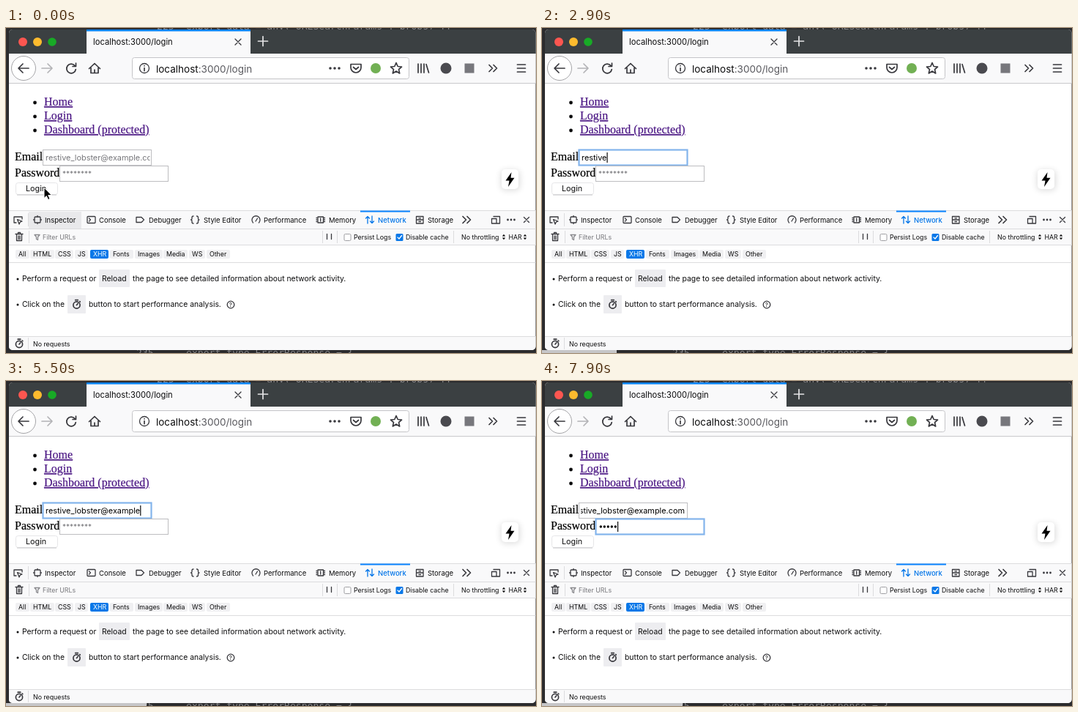
Write an HTML page that moves like this. It is 724x444 px and loops after 8000 ms.

```html
<!DOCTYPE html>
<html lang="en">
<head>
<meta charset="utf-8">
<title>Login demo</title>
<style>
html, body { margin: 0; width: 100%; height: 100%; overflow: hidden; background: #2b2b2d; }
svg { display: block; width: 724px; height: 444px; font-family: Inter, sans-serif; fill: #0c0c0d; }
text { white-space: pre; }
.serif { font: 16px "Liberation Serif", serif; fill: #000; stroke: #000; stroke-width: .2; }
.link { fill: #4b1784; stroke: #4b1784; text-decoration: underline; }
.mono { font: 13.1px "DejaVu Sans Mono", monospace; fill: #858588; }
.field { font-size: 10.9px; fill: #000; }
.tool { font-size: 9.5px; }
.small { font-size: 8.8px; }
.body { font-size: 10.38px; }
.ico { fill: none; stroke: #38383d; stroke-width: 1.3; stroke-linecap: round; stroke-linejoin: round; }
.big { stroke-width: 1.7; }
.sep { fill: none; stroke: #dcdcde; }
.chip { fill: #ededf0; }
.hint { fill: #77777b; }
</style>
</head>
<body>
<svg viewBox="0 0 724 444">
  <defs>
    <clipPath id="inEmail"><rect x="53" y="167" width="143.5" height="20"/></clipPath>
    <clipPath id="topStrip"><rect width="724" height="2"/></clipPath>
    <clipPath id="frame"><rect x="4" y="2" width="719.500" height="438" rx="5"/></clipPath>
    <filter id="soft" x="-60%" y="-60%" width="220%" height="220%"><feGaussianBlur stdDeviation="4"/></filter>
    <g id="watch" class="ico big"><circle cy="1" r="4.600"/><path d="M-1.800-5.800H1.800M0 1L1.800-1.200M4.200-4l.6.6"/></g>
    <path id="more" class="ico big" d="M-5-4.500L-.5 0L-5 4.500M1-4.500L5.500 0L1 4.500"/>
    <path id="updown" d="M-2.200-1L0-3.800L2.200-1ZM-2.200 1L0 3.800L2.200 1Z"/>
  </defs>

  <!-- desktop behind the window -->
  <rect width="724" height="444" fill="#2b2b2d"/>
  <g clip-path="url(#topStrip)" class="mono">
    <text x="206" y="2">225</text>
    <text x="246" y="2">export data = any('URLSearchParams', props) {}</text>
  </g>
  <g class="mono">
    <text x="178" y="448">235</text>
    <text x="246" y="448">export type ErrorResponse = {</text>
  </g>

  <g clip-path="url(#frame)">
  <!-- title bar -->
  <rect x="4" y="2" width="720" height="438" fill="#fff"/>
  <rect x="4" y="2" width="720" height="33" fill="#3b4042"/>
  <circle cx="23" cy="19" r="6" fill="#fc5650"/>
  <circle cx="43" cy="19" r="6" fill="#fdbb2e"/>
  <circle cx="63" cy="19" r="5.800" fill="#18aa26"/>
  <rect x="110" y="2" width="224" height="34" fill="#f9f9fa"/>
  <rect x="110" y="2" width="224" height="2.500" fill="#0a84ff"/>
  <text x="119" y="23" font-size="11.2">localhost:3000/login</text>
  <path class="ico" d="M313 15l8 8M321 15l-8 8"/>
  <path class="ico big" style="stroke:#e4e4e6" d="M344.500 18h13M351 11.500v13"/>

  <!-- navigation bar -->
  <rect x="4" y="35" width="720" height="40.500" fill="#f9f9fa"/>
  <path class="sep" style="stroke:#c9c9cc" d="M4 75.500H724"/>
  <circle cx="24" cy="55" r="16.500" fill="#fff" stroke="#a5a5a8"/>
  <path class="ico big" d="M31 55H17.500M23 49l-6 6l6 6"/>
  <path class="ico big" style="stroke:#b4b4b7" d="M49 55H62.500M57 49l6 6l-6 6"/>
  <path class="ico big" d="M94 51.500A6.300 6.300 0 1 0 95.300 56.500M95.500 48v4.500H91"/>
  <path class="ico big" d="M113.500 55.500L121 48.500L128.500 55.500M116 54v7.500h10V54M121 61v-4"/>
  <rect x="172.500" y="40.500" width="378" height="29" rx="3" fill="#fff" stroke="#c5c5c8"/>
  <circle class="ico" cx="189" cy="55" r="6.500"/>
  <path class="ico big" d="M189 54.500v4M189 51.600v.1"/>
  <text x="205" y="60.500" font-size="13.5">localhost<tspan fill="#59595e">:3000/login</tspan></text>
  <g fill="#38383d"><circle cx="443" cy="55" r="1.800"/><circle cx="449" cy="55" r="1.800"/><circle cx="455" cy="55" r="1.800"/></g>
  <path class="ico big" d="M471 49.500h14v4.500a7 7 0 0 1-14 0ZM474.500 53.500l3.500 3l3.500-3"/>
  <circle cx="505" cy="55" r="7" fill="#72b054"/>
  <path class="ico big" d="M533 47.500l2.200 5l5.300.5l-4 3.600l1.200 5.300l-4.700-2.800l-4.700 2.800l1.200-5.300l-4-3.600l5.300-.5Z"/>
  <path class="ico big" d="M563 49v12M567 49v12M571 49v12M574 49.500l3.500 11.500"/>
  <circle cx="601" cy="55" r="7.500" fill="#4a4a4f"/>
  <rect x="626.500" y="48.500" width="13" height="13" fill="#77777c"/>
  <use href="#more" x="665" y="55"/>
  <path class="ico big" d="M698.500 50h11M698.500 55h11M698.500 60h11"/>

  <!-- page -->
  <circle cx="39.500" cy="102" r="2.400"/><circle cx="39.500" cy="121" r="2.400"/><circle cx="39.500" cy="140" r="2.400"/>
  <text class="serif link" x="52" y="106">Home</text>
  <text class="serif link" x="52" y="125">Login</text>
  <text class="serif link" x="52" y="144">Dashboard (protected)</text>
  <text class="serif" x="12" y="181">Email</text>
  <text class="serif" x="12" y="203">Password</text>
  <rect id="emailBox" x="50.500" y="166.500" width="148" height="21"/>
  <rect id="passBox" x="73.500" y="188.500" width="148" height="21"/>
  <g clip-path="url(#inEmail)"><text id="email" class="field" x="54" y="181"></text></g>
  <text id="passHint" class="hint" x="77" y="203" font-size="10">********</text>
  <g id="dots"></g>
  <rect id="caret" width="1.200" height="14"/>
  <rect x="13.500" y="211.500" width="57" height="16" rx="3" fill="#fff" stroke="#e6e6e8"/>
  <path d="M15 228H69" stroke="#c4c4c7"/>
  <text x="27" y="223" font-size="10.8">Login</text>
  <rect x="676" y="194" width="26" height="28" rx="6" fill="#000" opacity=".13" filter="url(#soft)"/>
  <rect x="677" y="193" width="23" height="27" rx="5" fill="#fff"/>
  <path d="M690.500 197L682.500 208.500H687.500L686 217L694.500 204.800H689.500Z" fill="#000"/>

  <!-- developer tools: tabs -->
  <rect x="4" y="249" width="720" height="48" fill="#f9f9fa"/>
  <rect id="hover" x="31" y="251" width="72" height="23" fill="#e9e9eb"/>
  <path class="sep" d="M4 249.500H724M4 274.500H724M4 296.500H724M4 320.500H724M30.500 253v18"/>
  <path class="ico" d="M14 266h-3v-8h11v3M15.500 261.500l6.500 2.500l-2.800 1.200l-1.200 2.800Z"/>
  <rect class="ico" x="39" y="258" width="8" height="8" rx="1"/>
  <path class="ico" d="M43 256.500v1M43 266.500v1M37.500 262h1M47.500 262h1"/>
  <rect class="ico" x="111" y="257.500" width="11" height="9" rx="1"/>
  <path class="ico" d="M113.500 260l2 2l-2 2"/>
  <path class="ico" d="M178 258.500h7l3.500 3.500l-3.500 3.500h-7Z"/>
  <path class="ico" d="M256 257q-2 0-2 2v1.500q0 1.500-1.500 1.500q1.500 0 1.500 1.500V265q0 2 2 2M260.500 257q2 0 2 2v1.500q0 1.500 1.500 1.500q-1.500 0-1.500 1.500V265q0 2-2 2"/>
  <path class="ico" d="M337.500 266a5.500 5.500 0 1 1 8 0M341 264l2.500-4"/>
  <rect class="ico" x="426" y="258" width="7.500" height="8"/>
  <path class="ico" d="M424 259.500h1M424 262h1M424 264.500h1M434.500 259.500h1M434.500 262h1M434.500 264.500h1M429.700 260v4"/>
  <path class="ico" style="stroke:#0074e8" d="M494 267v-9.500M491.500 260l2.500-2.500l2.500 2.500M500 257v9.500M497.500 264l2.500 2.500l2.500-2.500"/>
  <rect x="484" y="249.500" width="68" height="2" fill="#0a84ff"/>
  <path class="ico" d="M560.500 257.500h9.500v9.500h-9.500ZM560.500 262h9.500M564 259.800h2.500M564 264.500h2.500"/>
  <g class="tool" id="tabs"></g>
  <use href="#more" x="629" y="262"/>
  <path class="ico" d="M666 257.500h8.500v9.500h-4M663.500 260.500h6.500v6.500h-6.500Z"/>
  <g fill="#38383d"><circle cx="685.500" cy="262" r="1.400"/><circle cx="690" cy="262" r="1.400"/><circle cx="694.500" cy="262" r="1.400"/></g>
  <path class="ico" d="M707.500 258.500l7 7M714.500 258.500l-7 7"/>

  <!-- developer tools: filters -->
  <path class="ico" d="M13 281.500h10M16.500 281v-1.500h3V281M14.500 282v8.500h7V282M17 284v4.500M19 284v4.500"/>
  <path class="sep" d="M31.500 277v17M432.500 277v17M452.500 277v17M611.500 277v17"/>
  <path class="ico" style="stroke:#8a8a8e" d="M39 282.500h7l-2.500 3v4l-2-1v-3Z"/>
  <path class="ico" d="M438.500 281.500v7M444.500 281.500v7"/>
  <rect x="462" y="281.500" width="9" height="9" rx="1.500" fill="#fff" stroke="#a0a0a4"/>
  <rect x="532.500" y="281" width="10" height="10" rx="1.500" fill="#0a78e8"/>
  <path class="ico" style="stroke:#fff" d="M535 286l2 2l3.500-4.500"/>
  <g class="small">
    <text class="hint" x="50" y="289">Filter URLs</text>
    <text x="475" y="289">Persist Logs</text>
    <text x="546" y="289">Disable cache</text>
    <text x="622" y="288.500">No throttling</text>
    <text x="686.500" y="288.500">HAR</text>
  </g>
  <use href="#updown" x="680" y="285.500"/><use href="#updown" x="709" y="285.500"/>
  <g class="small" id="kinds"></g>

  <!-- developer tools: message -->
  <circle cx="16" cy="343" r="1.500"/><circle cx="16" cy="378" r="1.500"/>
  <rect class="chip" x="127" y="330" width="42" height="24" rx="1"/>
  <rect class="chip" x="84" y="365" width="25" height="25" rx="1"/>
  <g class="body">
    <text x="22" y="346">Perform a request or</text>
    <text x="131" y="346">Reload</text>
    <text x="173" y="346">the page to see detailed information about network activity.</text>
    <text x="22" y="381">Click on the</text>
    <text x="113" y="381">button to start performance analysis.</text>
  </g>
  <use href="#watch" x="96.500" y="377.500"/>
  <circle class="ico" cx="307" cy="378" r="4.800"/>
  <text x="304.800" y="381" font-size="8">?</text>
  <rect x="4" y="421" width="720" height="19" fill="#f9f9fa"/>
  <path class="sep" d="M4 421.500H724M30.500 423v16"/>
  <use href="#watch" x="18" y="431"/>
  <text class="small" x="37" y="435">No requests</text>
  </g>

  <rect id="progress" y="440" height="4" fill="#c6c6c8"/>
  <path id="arrow" d="M0 0V14.500L3.300 11.500L5.600 16.500L8 15.400L5.700 10.500H10.300Z" fill="#000" stroke="#fff"/>
  <path id="beam" d="M-2.500-7Q0-7 0-5Q0-7 2.500-7M0-5V5M-2.500 7Q0 7 0 5Q0 7 2.500 7" fill="none" stroke="#222"/>
</svg>
<script>
const LOOP = 8000, FOCUS = 1000, TAB = 6000;
const address = "restive_lobster@example.com";
const emailKeys = [
  1500, 1900, 2000, 2200, 2300, 2500, 2700,
  3000, 3200, 3300, 3400, 3600, 3700, 3900, 4100, 4300,
  4700, 4800, 4900, 5000, 5200, 5300, 5500, 5600, 5700, 5800, 5900
];
const passKeys = [6700, 7000, 7200, 7500, 7800];
const $ = id => document.getElementById(id);
const show = (id, on) => $(id).setAttribute("visibility", on ? "visible" : "hidden");
const label = (x, y, s, fill) => `<text x="${x}" y="${y}"${fill ? ` fill="${fill}"` : ""}>${s}</text>`;

$("tabs").innerHTML = [
  [53, "Inspector"], [127, "Console"], [195, "Debugger"], [270, "Style Editor"],
  [352, "Performance"], [441, "Memory"], [508, "Network", "#0074e8\" font-weight=\"500"], [576, "Storage"]
].map(([x, s, c]) => label(x, 265.5, s, c)).join("");

$("kinds").innerHTML = [
  [17, 11, "All"], [37, 25, "HTML"], [71, 17, "CSS"], [98, 10, "JS"], [119, 17, "XHR"],
  [146, 24, "Fonts"], [180, 30, "Images"], [219, 25, "Media"], [254, 14, "WS"], [278, 24, "Other"]
].map(([x, w, s]) => {
  const on = s === "XHR";
  return `<rect x="${x - 4}" y="303" width="${w + 8}" height="12" rx="2" fill="${on ? "#0a78e8" : "#f0f0f2"}"/>`
    + label(x, 312, s, on && "#fff");
}).join("");

$("dots").innerHTML = passKeys.map((k, i) =>
  `<circle cx="${80.3 + i * 5}" cy="199" r="1.7" fill="#000"/>`).join("");

function setBox(id, focused) {
  const box = $(id);
  box.setAttribute("fill", "#fff");
  box.setAttribute("stroke", focused ? "#83b4ec" : "#bdbdc0");
  box.setAttribute("stroke-width", focused ? 2.2 : 1);
}

function draw(t) {
  const typed = emailKeys.filter(k => k <= t).length;
  const hidden = passKeys.filter(k => k <= t).length;
  const inEmail = t >= FOCUS && t < TAB, inPass = t >= TAB;
  setBox("emailBox", inEmail);
  setBox("passBox", inPass);

  const email = $("email");
  const value = address.slice(0, typed);
  email.textContent = value || address;
  email.style.fill = value ? "#000" : "#77777b";
  const width = value ? email.getComputedTextLength() : 0;
  const left = Math.min(54, 195 - width);
  email.setAttribute("x", value ? left : 54);

  show("passHint", !hidden);
  [...$("dots").children].forEach((d, i) => d.setAttribute("visibility", i < hidden ? "visible" : "hidden"));

  const last = [FOCUS, TAB, ...emailKeys, ...passKeys].filter(k => k <= t).reduce((a, b) => Math.max(a, b), 0);
  show("caret", (inEmail || inPass) && (t - last) % 1000 < 500);
  $("caret").setAttribute("x", inPass ? (hidden ? 78 + hidden * 5 : 77) : left + width);
  $("caret").setAttribute("y", inPass ? 192 : 170);

  // pointer glides from the button into the email field
  const p = Math.min(1, Math.max(0, (t - 100) / 700));
  const e = p * p * (3 - 2 * p);
  const x = 52 + 58 * e, y = 218 - 41 * e;
  const overField = y < 188 || (x > 73 && y < 210);
  for (const id of ["arrow", "beam"]) $(id).setAttribute("transform", `translate(${x} ${y})`);
  show("arrow", !overField);
  show("beam", overField && t < emailKeys[0]);
  $("hover").setAttribute("opacity", Math.max(0, 1 - Math.max(0, t - 100) / 200));

  $("progress").setAttribute("width", t < 500 ? 0 : t < 2000 ? 12 : t < 4100 ? 102 : 192);
}

function tick(now) {
  draw(now % LOOP);
  requestAnimationFrame(tick);
}
draw(0);
requestAnimationFrame(tick);
</script>
</body>
</html>
```
